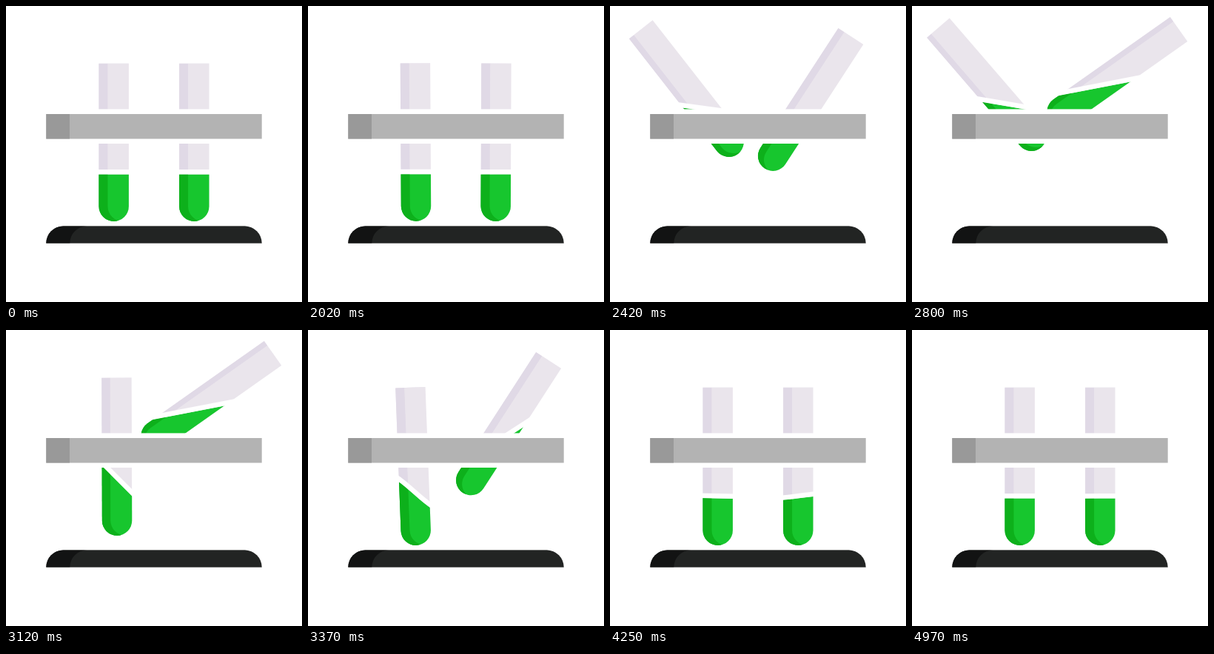
Write an HTML page with a canvas that moves like this. It is 400 by 400 pixels and loops after 5.02 s.

```html
<!DOCTYPE html>
<html lang="en">
<head>
<meta charset="utf-8">
<title>Test tubes</title>
<style>
html, body { margin: 0; height: 100%; overflow: hidden; background: #fff; }
canvas { display: block; }
</style>
</head>
<body>
<canvas id="stage" width="400" height="400"></canvas>
<script>
const ctx = document.getElementById('stage').getContext('2d');
const LOOP = 5020, START = 2005, FALL = 500, LAG = 270, R = 20.2, LENGTH = 193;

// x: resting place; dx, dy, tilt: pose at the top of the hop; rise, land: timing in ms
const tubes = [
  { x: 145.7, dx: 16.2, dy: -98.5, tilt: -42, rise: 535, land: 3240 },
  { x: 254.3, dx: -51.5, dy: -128, tilt: 54.8, rise: 800, land: 3630 }
];

const rad = deg => deg * Math.PI / 180;
const clamp = u => Math.max(0, Math.min(1, u));

// Eased rise to 1, hold, and eased fall back to 0
function hop(t, rise, land) {
  const u = clamp(Math.min((t - START) / rise, (land - t) / FALL));
  return Math.sin(u * Math.PI / 2) ** 2;
}

// Sine that starts at s = 0 and dies out at s = span
function swing(s, period, span, power) {
  return s < 0 ? 0 : clamp(1 - s / span) ** power * Math.sin(2 * Math.PI * s / period);
}

const lean = (tube, k) => tube.tilt * k ** 0.8;

function rect(color, x, y, w, h) {
  ctx.fillStyle = color;
  ctx.fillRect(x, y, w, h);
}

// Fills a shape and darkens the part outside its shifted copy
function shaded(path, shift, dark, light) {
  const shade = new Path2D();
  shade.rect(-400, -400, 1200, 1200);
  shade.addPath(path, new DOMMatrix().translate(shift, 0));
  ctx.save();
  ctx.fillStyle = light;
  ctx.fill(path);
  ctx.clip(path);
  ctx.fillStyle = dark;
  ctx.fill(shade, 'evenodd');
  ctx.restore();
}

const tubeShape = new Path2D();
tubeShape.moveTo(-R, -LENGTH);
tubeShape.lineTo(R, -LENGTH);
tubeShape.arc(0, 0, R, 0, Math.PI);
tubeShape.closePath();

const baseShape = new Path2D();
baseShape.roundRect(54.3, 297.6, 291.4, 23, [24, 24, 0, 0]);

function drawTube(tube, t) {
  const { land, rise } = tube, side = Math.sign(tube.tilt);
  const k = hop(t, rise, land);
  const tilt = lean(tube, k) - 0.3 * tube.tilt * swing(t - land + 210, 570, 750, 2);

  // The liquid follows the tilt, lags on the way down, then sloshes
  const pour = -Math.tan(rad(1.2 * lean(tube, hop(t, rise, land + LAG))));
  const slosh = side * swing(t - land + 120, 380, 1500, 1.5);
  const slope = pour + slosh;
  const stir = Math.min(1, pour ** 2 + slosh ** 2);
  const height = 43.2 + 10.5 * stir;
  const bend = -8 * slosh * (1 - stir);

  const w = 24;
  const surface = lift => {
    const y = -height - lift, p = new Path2D();
    p.moveTo(-w, y - w * slope);
    p.bezierCurveTo(-w / 3, y - w / 3 * slope + bend, w / 3, y + w / 3 * slope - bend, w, y + w * slope);
    return p;
  };

  const shift = 12 - 4.5 * k;
  ctx.save();
  ctx.translate(tube.x + tube.dx * k ** 0.65, 270.7 + tube.dy * k);
  ctx.rotate(rad(tilt));
  shaded(tubeShape, shift, '#e0d9e6', '#eae5ec');

  ctx.save();
  const liquid = surface(0);
  liquid.lineTo(w, 60);
  liquid.lineTo(-w, 60);
  liquid.closePath();
  ctx.clip(liquid);
  shaded(tubeShape, shift, '#0db01b', '#17c62e');
  ctx.restore();

  // Gap between liquid and glass
  ctx.strokeStyle = '#fff';
  ctx.lineWidth = 6.5;
  ctx.stroke(surface(3.2 * Math.hypot(1, slope)));
  ctx.restore();
}

function draw(t) {
  rect('#fff', 0, 0, 400, 400);
  for (const tube of tubes) drawTube(tube, t);
  rect('#fff', 0, 139.4, 400, 46.6);
  rect('#b3b3b3', 54.3, 146, 291.4, 33.5);
  rect('#999', 54.3, 146, 31.7, 33.5);
  shaded(baseShape, 32, '#121313', '#222423');
}

const begin = performance.now();
function frame() {
  draw((performance.now() - begin) % LOOP);
  requestAnimationFrame(frame);
}
frame();
</script>
</body>
</html>
```
